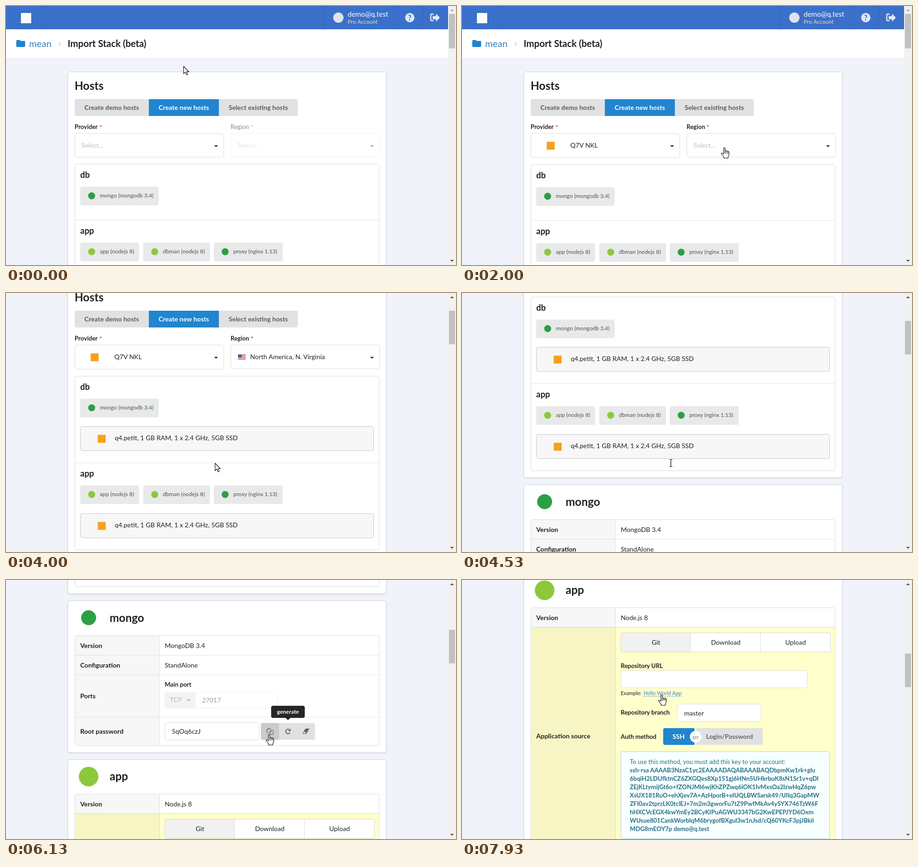
Animation, 964 px wide and 556 px high, one loop 8 s. Source, as an HTML page:

```html
<!DOCTYPE html>
<html lang="en">
<head>
<meta charset="utf-8">
<title>Import Stack</title>
<style>
  html, body { margin: 0; width: 100%; height: 100%; overflow: hidden; background: #f0f3f9; }
  svg { display: block; width: 964px; height: 556px; font-family: Lato, sans-serif; }
  text { white-space: pre; }
  .card { fill: #fff; stroke: #d4d5d7; filter: drop-shadow(0 1px 1px rgba(34, 36, 38, .13)); }
  .menu { filter: drop-shadow(0 2px 2px rgba(34, 36, 38, .15)); }
</style>
</head>
<body>
<svg id="stage" xmlns="http://www.w3.org/2000/svg"></svg>
<script>
const INK = '#212223', LINE = '#dcddde', BLUE = '#2185d0', FOCUS = '#96c8da';
const ORANGE = '#f7a11a', LEAF = '#2c9f45', LIME = '#8cc83c';

// Markup helpers
const rect = (x, y, w, h, fill, r = 0, extra = '') =>
  `<rect x="${x}" y="${y}" width="${w}" height="${h}" rx="${r}" fill="${fill}" ${extra}/>`;
const box = (x, y, w, h, fill = '#fff', stroke = LINE, r = 4, extra = '') =>
  rect(x + .5, y + .5, w - 1, h - 1, fill, r, `stroke="${stroke}" ${extra}`);
const text = (s, x, y, size = 14, fill = INK, weight = 400, anchor = 'start') =>
  `<text x="${x}" y="${y}" font-size="${size}" fill="${fill}" font-weight="${weight}" text-anchor="${anchor}">${s}</text>`;
const bold = (s, x, y, size = 14, fill = INK, anchor) => text(s, x, y, size, fill, 700, anchor);
const path = (d, fill = 'none', extra = '') => `<path d="${d}" fill="${fill}" ${extra}/>`;
const stroke = (d, color = LINE, width = 1) => path(d, 'none', `stroke="${color}" stroke-width="${width}"`);
const dot = (x, y, r, fill) => `<circle cx="${x}" cy="${y}" r="${r}" fill="${fill}"/>`;
const square = (x, y, size, fill) => rect(x - size / 2, y - size / 2, size, size, fill);
const group = (id, content) => `<g id="${id}">${content}</g>`;
const shift = (y, content) => `<g transform="translate(0 ${y})">${content}</g>`;
const down = (x, y, fill = INK) => path(`M${x - 4} ${y - 2}h8l-4 4z`, fill);
const up = (x, y, fill = INK) => path(`M${x - 4} ${y + 2}h8l-4 -4z`, fill);
const card = (y, h) => rect(132.5, y + .5, 682, h, '#fff', 4, 'class="card"');

function flag(kind, x, y) {
  const f = (fill, dx, dy, w, h) => rect(x + dx, y + dy, w, h, fill);
  const disc = (fill, r) => dot(x + 8, y + 5.5, r, fill);
  const art = {
    jp: () => f('#fff', 0, 0, 16, 11) + disc('#d22', 3),
    kr: () => f('#fff', 0, 0, 16, 11) + disc('#c33', 3) + path(`M${x + 5} ${y + 5.5}a3 3 0 0 0 6 0z`, '#248'),
    in: () => f('#f93', 0, 0, 16, 4) + f('#fff', 0, 4, 16, 3) + f('#183', 0, 7, 16, 4) + disc('#339', 1.2),
    sg: () => f('#d33', 0, 0, 16, 5.5) + f('#fff', 0, 5.5, 16, 5.5),
    au: () => f('#238', 0, 0, 16, 11) + f('#c44', 0, 2, 8, 2) + f('#fff', 11, 3, 2, 2) + f('#fff', 4, 8, 2, 2),
    br: () => f('#17843b', 0, 0, 16, 11) + path(`M${x + 2} ${y + 5.5}l6 -4l6 4l-6 4z`, '#f6d921') + disc('#24408e', 2.2),
    us: () => f('#fff', 0, 0, 16, 11) + [0, 2, 4, 6, 8, 10].map(i => f('#d5444e', 0, i, 16, 1)).join('') + f('#3c64b4', 0, 0, 8, 6),
    gb: () => f('#26408f', 0, 0, 16, 11) + stroke(`M${x} ${y}l16 11m0 -11l-16 11`, '#fff', 2) +
      f('#fff', 6, 0, 4, 11) + f('#fff', 0, 4, 16, 3) + f('#cf2030', 7, 0, 2, 11) + f('#cf2030', 0, 5, 16, 1)
  };
  return art[kind]() + box(x, y, 16, 11, 'none', 'rgba(0,0,0,.2)', 0);
}

const chip = (x, y, w, label, color) =>
  rect(x, y, w, 40, '#e8e9e9', 4) + dot(x + 24.5, y + 19.5, 7.5, color) + text(label, x + 42, y + 23, 12, '#505152');

const hostBox = y => box(159, y, 629, 53, '#f7f7f7', '#c6c7c8') + square(205, y + 27, 17, ORANGE) +
  text('q4.petit, 1 GB RAM, 1 x 2.4 GHz, 5GB SSD', 233, y + 30);

const tooltip = (id, label, x, y, w) => group(id,
  rect(x - w / 2, y, w, 26, '#262626', 4) + path(`M${x - 6} ${y + 25}h12l-6 6z`, '#262626') +
  bold(label, x, y + 17, 12, '#fff', 'middle'));

// Page sections, in document coordinates
const header = rect(0, 0, 947, 50, '#3a70ca') +
  stroke('M84.5 0V50M679.5 0V50M838.5 0V50M892.5 0V50', '#3363b6') +
  square(43, 26, 22, '#fff') + dot(712, 25, 11, '#dfe3ec') +
  text('demo@q.test', 732, 23, 15, '#fff') + text('Pro Account', 732, 38, 12, '#ffd9a6') +
  dot(865, 25, 10, '#dfe8f6') + bold('?', 865, 31, 17, '#3a70ca', 'middle') +
  stroke('M916 17.5h-4q-2 0 -2 2v10q0 2 2 2h4', '#dfe8f6', 2.6) +
  path('M914 21.5h7v-5l8.5 8.5l-8.5 8.5v-5h-7z', '#dfe8f6') +
  rect(0, 50, 947, 61, '#fff') +
  path('M22 75q0 -2 2 -2h5q2 0 2 2h8q2 0 2 2v9q0 2 -2 2h-15q-2 0 -2 -2z', BLUE) +
  text('mean', 49.5, 88, 20, '#2d7fc0') + stroke('M113 78l4 4l-4 4', '#c8c9ca', 1.3) +
  bold('Import Stack (beta)', 132, 88, 20);

const field = (id, x, label, starX, value) => bold(label, x, 264, 13) +
  bold('*', starX, 265, 14, '#d9502b') +
  box(x, 273, 320, 52, '#fff', LINE, 4, `id="${id}Box"`) + down(x + 303, 301) +
  group(id + 'Empty', text('Select...', x + 14.5, 304, 14, '#bfbfbf')) + group(id + 'Value', value);

const form = bold('Hosts', 147, 180, 24) + rect(147, 200, 478, 36, '#e0e1e2', 4) + rect(306, 200, 150, 36, BLUE) +
  bold('Create demo hosts', 226.5, 223, 14, '#5c5d5e', 'middle') +
  bold('Create new hosts', 381, 223, 14, '#fff', 'middle') +
  bold('Select existing hosts', 540.5, 223, 14, '#5c5d5e', 'middle') +
  field('provider', 147, 'Provider', 200, square(190, 300, 17, ORANGE) + text('Q7V NKL', 232, 304)) +
  group('region', field('region', 481, 'Region', 524, flag('us', 497, 294) + text('North America, N. Virginia', 523, 304)));

const hosts = box(147, 339, 653, 374) + bold('db', 159, 369, 18) +
  chip(159, 388, 168, 'mongo (mongodb 3.4)', LEAF) + group('dbHost', hostBox(447)) +
  group('appHosts', stroke('M148 459.5H799', '#e4e5e6') + bold('app', 159, 489, 18) +
    chip(159, 508, 126, 'app (nodejs 8)', LIME) + chip(294, 508, 143, 'dbman (nodejs 8)', LIME) +
    chip(445, 508, 148, 'proxy (nginx 1.13)', LEAF) + hostBox(568));

const providerMenu = box(147, 322, 320, 152, '#fff', FOCUS, 4, 'class="menu"') + rect(148, 320, 318, 5, '#fff') +
  stroke('M147.5 318V326M466.5 318V326', FOCUS) +
  rect(148, 324, 302, 51, '#f2f2f2') + stroke('M148 426.5H450', '#f6f6f6') +
  square(192, 350, 18, ORANGE) + text('Q7V NKL', 234, 354) +
  dot(191, 400, 11, '#0080ff') + text('Q7V ZU', 234, 405) +
  square(192, 451, 13, '#4c4e55') + text('My Drelk', 234, 456) +
  rect(450, 325, 16, 148, '#f1f1f1') + up(457.5, 333, '#a3a3a3') + rect(451, 341, 13, 90, '#c1c1c1') + down(457.5, 464, '#404040');

const regions = [
  ['jp', 'Asia Pacific, Tokyo'], ['kr', 'Asia Pacific, Seoul'], ['in', 'Asia Pacific, Mumbai'],
  ['sg', 'Asia Pacific, Singapore'], ['au', 'Asia Pacific, Sydney'], ['br', 'South America, Sao Paulo'],
  ['us', 'North America, N. Virginia'], ['us', 'North America, N. California'],
  ['us', 'North America, Oregon'], ['gb', 'Europe, London']];
const regionMenu = box(481, 322, 319, 152, '#fff', FOCUS, 4, 'class="menu"') + rect(482, 320, 317, 5, '#fff') +
  stroke('M481.5 318V326M799.5 318V326', FOCUS) +
  `<g clip-path="url(#listClip)">` + group('regionList', rect(482, 0, 300, 37, '#f2f2f2', 0, 'id="regionHover"') +
    regions.map(([code, name], i) => flag(code, 498, i * 37 + 12) + text(name, 524.5, i * 37 + 23) +
      stroke(`M482 ${i * 37 + 36.5}H782`, '#f8f8f8')).join('')) + '</g>' +
  rect(782, 325, 16, 148, '#f1f1f1') + up(790.5, 333, '#404040') +
  rect(784, 342, 13, 33, '#c1c1c1', 0, 'id="regionThumb"') + down(790.5, 464, '#404040');

const mongo = card(44, 326) + dot(177, 81, 16, LEAF) + bold('mongo', 222, 89.5, 24) +
  box(147, 119, 653, 237) + rect(148, 120, 180, 235, '#f7f7f7', 3) +
  stroke('M328.5 120V355M148 161.5H799M148 203.5H799M148 294.5H799', '#e1e2e3') +
  bold('Version', 159, 146) + text('MongoDB 3.4', 340, 146) +
  bold('Configuration', 159, 188) + text('StandAlone', 340, 188) +
  bold('Ports', 159, 254) + bold('Main port', 340, 229, 13) +
  box(340, 241, 243, 35, '#fff', '#efefef') + rect(340, 241, 66, 35, '#f3f3f4', 4) +
  text('TCP', 351, 262, 14, '#b9b9ba') + down(391.5, 258, '#b0b0b0') + text('27017', 420, 263, 14, '#a0a0a0') +
  bold('Root password', 159, 330) + box(340, 306, 203, 38, '#fff', LINE, 4, 'id="passwordBox"') +
  group('selection', rect(355, 316, 62, 18, '#c2c2c2') +
    stroke('M355 333' + 'l2 -2l2 2'.repeat(15), '#e02020', 1.2)) +
  group('password', text('5qOq6czJ', 355, 330)) +
  rect(546, 307, 116, 36, '#e0e1e2', 4) +
  rect(546, 307, 39, 36, '#cacbcd', 4, 'id="copyHover"') + rect(585, 307, 38, 36, '#cacbcd', 0, 'id="generateHover"') +
  stroke('M565 327.5h-6.500v-6l3 -3h5v4M562.500 318.500v3h-3.500M565.500 325.500l3 -3h4v9h-7zM568.500 322.500v3h-3', '#606162') +
  stroke('M607.5 321.5a5 5 0 1 0 1 6', '#606162', 1.8) + path('M609.5 319v5.5h-5.5z', '#606162') +
  path('M641.5 319h8.5l-6.5 11h-8.5z', '#606162') + path('M638.5 326h4.2l-1.8 3h-4.2z', '#e0e1e2');

const keyLines = [
  'ssh-rsa AAAAB3NzaC1yc2EAAAADAQABAAABAQDbpmKw1rk+glu',
  '6bqiH2LDUfktnCZ6ZXGQes8Xp151gj6HNn5UHkrbuK8sN1Sr1v+qDl',
  'ZEjKLtymijGt6o+fZONJMl6wjKhZPZwq6iOK1IvMxsOa2lzwHqZ6pw',
  'XsUX181RuO+ehXjev7A+AzHporB+eIUQLBWSarsk49/UIIq3GapMW',
  'ZFI0av2tprzLK0tclEJ+7m2m3gworFu7tZ9PwfMkAv4ySYX746TzW6F',
  'hHXCVcEGX4kwYmEy2BCyKIPuAGWU3347bG2KwEPEPJYD6Oxm',
  'WUsue801CankWorblqM6brygofBXgul3w1nJsd/cQ60YKcF3pjJBkii',
  'MDG8mEOY7p demo@q.test'];
const app = card(-15, 700) + dot(177, 22, 21, LIME) + bold('app', 222, 30, 24) +
  box(147, 59, 653, 600) + rect(148, 60, 180, 41, '#f7f7f7', 3) +
  rect(148, 101, 180, 540, '#f7f5c4') + rect(328, 101, 471, 540, '#ffffcc') +
  stroke('M328.5 60V101M148 101.5H799', '#dcdccb') + stroke('M328.5 102V600', '#dfddae') +
  bold('Version', 159, 86) + text('Node.js 8', 340, 86) + bold('Application source', 159, 340) +
  box(340, 113, 450, 42, '#fff', '#d4d4d5', 2) + rect(341, 114, 149, 40, '#f1f1f1') + stroke('M489.5 114V154M639.5 114V154') +
  ['Git', 'Download', 'Upload'].map((s, i) => text(s, 415.5 + i * 149.5, 139, 14, INK, 400, 'middle')).join('') +
  bold('Repository URL', 340, 189, 13) + box(340, 194, 400, 38) +
  text('Example:', 340, 247, 11.2) + text('Hello World App', 389, 247, 11.2, '#4183c4') +
  path('M389 249.5H471', 'none', 'stroke="#4183c4" stroke-dasharray="3 2"') +
  bold('Repository branch', 340, 289, 13) + box(461, 266, 180, 38) + text('master', 476, 291) +
  bold('Auth method', 340, 341, 13) +
  path('M498 318h-63q-4 0 -4 4v28q0 4 4 4h63z', BLUE) + path('M502 318h138q4 0 4 4v28q0 4 -4 4h-138z', '#e0e1e2') +
  dot(500.5, 336.5, 12.5, '#fff') + bold('or', 500.5, 341.5, 14, '#a0a0a0', 'middle') +
  bold('SSH', 464, 341, 14, '#fff', 'middle') + bold('Login/Password', 573, 341, 14, '#666768', 'middle') +
  box(340, 368, 448, 188, '#f8ffff', '#a9d5de') +
  text('To use this method, you must add this key to your account:', 359.5, 395, 13, '#276f86') +
  keyLines.map((s, i) => bold(s, 359.5, 413 + i * 18, 13, '#276f86')).join('');

const scrollbar = rect(947, 0, 17, 556, '#f1f1f1') + group('upArrow', up(955.5, 9, 'currentColor')) + down(955.5, 547, '#505050') +
  rect(949, 17, 13, 74, '#c1c1c1', 0, 'id="thumb"');

const outline = 'stroke="#000" stroke-width="1.1" stroke-linejoin="round"';
const cursors =
  group('arrow', path('M.5 .5v16l3.8 -3.6l2.6 6l2.4 -1l-2.6 -5.8h5z', '#fff', outline)) +
  group('hand', path('M-1.5 14V1.5Q-1.5 0 0 0T1.5 1.5V8Q1.5 6.5 3 6.5T4.5 8.5Q4.5 7 6 7T7.5 9Q7.5 8 8.7 8T10 9.5V15Q10 17 8 19.5V22.5H-1V20Q-3 17.5 -6 14Q-7 12.5 -5.5 11.5Q-4 11 -1.5 14Z', '#fff', outline) +
    stroke('M1.5 8v5M4.5 8.5v4.5M7.5 9v4', '#000')) +
  group('beam', stroke('M-3 -7.5h2.5l.5 .5l.5 -.5h2.5M0 -7.5v15M-3 7.5h2.5l.5 -.5l.5 .5h2.5', '#000', 1.2));

const stage = document.getElementById('stage');
stage.innerHTML = '<clipPath id="listClip"><rect x="482" y="324" width="300" height="149"/></clipPath>' +
  group('page', header + card(141, 587) + form + group('hosts', hosts) +
    group('providerMenu', providerMenu) + group('regionMenu', regionMenu) +
    shift(1099, app) +
    shift(699, mongo + tooltip('generateTip', 'generate', 604, 270, 72) + tooltip('copyTip', 'copy to clipboard', 565, 278, 116))) +
  scrollbar + group('cursor', cursors);
const el = {};
stage.querySelectorAll('[id]').forEach(node => el[node.id] = node);

// Timeline
const LOOP = 8000, STEP = 1000 / 15;
const scrollKeys = [[3700, 0], [4070, 200], [4400, 250], [4533, 332], [4670, 399], [5200, 399], [5560, 699],
  [7100, 699], [7200, 828], [7560, 1099]];
const listKeys = [[2300, 0], [2500, 100], [2600, 100], [2800, 199]];
const cursorKeys = [[200, 380, 129], [530, 361, 300], [850, 361, 300], [1200, 360.5, 334.5], [1500, 360.5, 334.5],
  [1950, 562, 304], [2060, 562, 304], [2260, 560.5, 375.5], [3330, 560.5, 375.5], [3700, 447.5, 365],
  [4780, 447.5, 365], [4930, 442, 361], [5000, 442, 362], [5500, 442, 362], [5860, 604, 328], [5970, 604, 328],
  [6120, 563.5, 331.5], [6600, 563.5, 331.5], [6860, 446.5, 327], [7560, 446.5, 327], [7900, 427.5, 246.5]];
const cursorKinds = [[0, 'arrow'], [460, 'hand'], [3300, 'arrow'], [4070, 'beam'], [4800, 'arrow'], [5740, 'hand'],
  [6690, 'beam'], [7500, 'hand'], [7640, 'arrow'], [7830, 'hand']];

const smooth = p => p * p * (3 - 2 * p);
function track(keys, t, ease = p => p) {
  const next = keys.findIndex(k => k[0] > t);
  if (next < 0) return keys[keys.length - 1].slice(1);
  if (next === 0) return keys[0].slice(1);
  const a = keys[next - 1], b = keys[next], p = ease((t - a[0]) / (b[0] - a[0]));
  return a.slice(1).map((v, i) => v + (b[i + 1] - v) * p);
}
const show = (id, on) => el[id].style.display = on ? '' : 'none';
const set = (id, name, value) => el[id].setAttribute(name, value);
const move = (id, x, y) => set(id, 'transform', `translate(${x} ${y})`);

function draw(t) {
  const within = (a, b = LOOP) => t >= a && t < b;
  const scroll = Math.round(track(scrollKeys, t)[0]);
  const list = Math.round(track(listKeys, t)[0]);
  const [x, y] = track(cursorKeys, t, smooth);
  const provided = within(1460), located = within(3260);

  move('page', 0, -scroll);
  set('thumb', 'y', 17 + Math.round(scroll * .1283));
  set('thumb', 'height', located ? 72 : 74);
  set('upArrow', 'color', scroll ? '#505050' : '#a3a3a3');

  show('providerMenu', within(800, 1460));
  show('providerEmpty', !provided);
  show('providerValue', provided);
  set('providerBox', 'height', provided ? 52 : 51);
  set('providerBox', 'stroke', within(800, 1460) ? FOCUS : within(460, 800) ? '#b9babb' : LINE);

  set('region', 'opacity', provided ? 1 : .4);
  show('regionMenu', within(2060, 3260));
  show('regionEmpty', !located);
  show('regionValue', located);
  set('regionBox', 'stroke', within(2060, 3260) ? FOCUS : LINE);
  move('regionList', 0, 324 - list);
  set('regionHover', 'y', Math.max(0, Math.floor((y - 324 + list) / 37)) * 37);
  set('regionThumb', 'y', 342 + Math.round(list * .216));

  move('hosts', 0, provided ? 1 : 0);
  move('appHosts', 0, located ? 66 : 0);
  show('dbHost', located);

  show('password', within(5930));
  show('selection', within(6450));
  set('passwordBox', 'stroke', within(6450) ? '#85b7d9' : LINE);
  show('generateHover', within(5770, 6060));
  show('copyHover', within(6060, 6680));
  show('generateTip', within(5830, 6170));
  show('copyTip', within(6190, 6930));

  const kind = cursorKinds.filter(k => k[0] <= t).pop()[1];
  for (const name of ['arrow', 'hand', 'beam']) show(name, name === kind);
  move('cursor', x, y);
}

(function frame() {
  const t = performance.now() % LOOP;
  draw(Math.floor((t + 5) / STEP) * STEP % LOOP);
  requestAnimationFrame(frame);
})();
</script>
</body>
</html>
```
